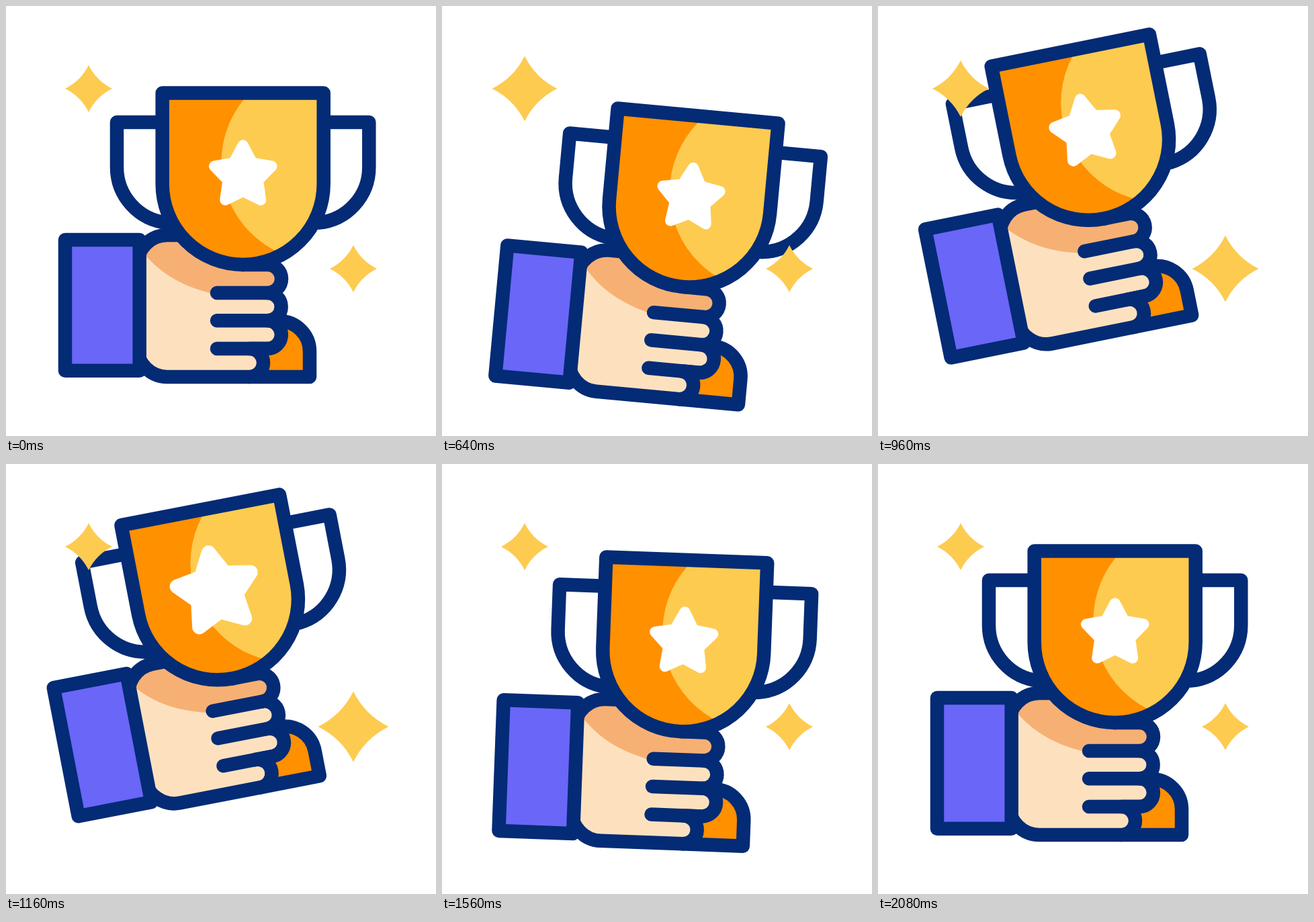
Write an HTML page with a canvas that moves like this. It is 640 px wide and 640 px high and loops after 2.12 s.

```html
<!DOCTYPE html>
<html lang="en">
<head>
<meta charset="utf-8">
<title>Trophy</title>
<style>
html, body { margin: 0; width: 100%; height: 100%; overflow: hidden; background: #fff; }
canvas { display: block; width: 100vw; height: 100vh; object-fit: contain; }
</style>
</head>
<body>
<canvas id="stage" width="640" height="640"></canvas>
<script>
const ctx = document.getElementById('stage').getContext('2d');
const LOOP = 2120, STEP = 40, LINE = 20.5;
const NAVY = '#042b75', ORANGE = '#ff9000', YELLOW = '#fdcb50',
      PURPLE = '#6a66f8', SKIN = '#fde1bf', SHADE = '#f7b074';

const base = new Path2D('M362 552H452V514A45 45 0 0 0 407 469H362Z');
const hand = new Path2D('M195 386A45 45 0 0 1 240 341H265L352 375V385H389' +
  'A20.9 20.9 0 0 1 389 427A20.6 20.6 0 0 1 389 468.3A20.8 20.8 0 0 1 389 510H362' +
  'A21 21 0 0 1 362 552H240A45 45 0 0 1 195 507Z');
const shade = new Path2D('M195 355C225 398 265 420 320 431H425V330H195Z');
const gaps = new Path2D('M314 427H389M314 468.3H389M314 510H389');
const sleeve = new Path2D('M88 347.9H198.7V542.7H88Z');
const handles = new Path2D('M232.7 173H165V240A83 83 0 0 0 240 322.6' +
  'M472.7 173H540.3V240A83 83 0 0 1 465.4 322.6');
const cup = new Path2D('M232.7 129.6H472.7V265A120 120 0 0 1 232.7 265Z');
const shine = new Path2D();
shine.arc(468.5, 232.7, 148, 0, Math.PI * 2);

const star = new Path2D();
for (let i = 0; i < 10; i++) {
  const r = i % 2 ? 23.5 : 45, a = i * Math.PI / 5;
  star.lineTo(r * Math.sin(a), 2.3 - r * Math.cos(a));
}
star.closePath();

const spark = new Path2D('M0 -35Q11.6 -11.6 35 0Q11.6 11.6 0 35Q-11.6 11.6 -35 0Q-11.6 -11.6 0 -35Z');

const ease = u => u < 0.5 ? 0.5 * (2 * u) ** 2.4 : 1 - 0.5 * (2 - 2 * u) ** 2.4;

// keys: [time, value] pairs, eased between neighbours
function tween(keys, t) {
  if (t <= keys[0][0]) return keys[0][1];
  for (let i = 1; i < keys.length; i++) {
    const [t0, v0] = keys[i - 1], [t1, v1] = keys[i];
    if (t < t1) return v0 + (v1 - v0) * ease((t - t0) / (t1 - t0));
  }
  return keys[keys.length - 1][1];
}

const tilt = [[80, 0], [558, 6], [1036, -12], [1058, -12], [1508, 2.15], [2015, 0]];
const starPop = [[820, 1], [1220, 1.32], [1610, 1]];
const leftPop = [[240, 1], [722, 1.4], [1200, 1]];
const rightPop = [[620, 1], [1120, 1.5], [1600, 1]];

function fill(path, color) {
  ctx.fillStyle = color;
  ctx.fill(path);
}

function stroke(path, color = NAVY, width = LINE) {
  ctx.strokeStyle = color;
  ctx.lineWidth = width;
  ctx.stroke(path);
}

function shaded(path, color, patch, patchColor) {
  fill(path, color);
  ctx.save();
  ctx.clip(path);
  fill(patch, patchColor);
  ctx.restore();
  stroke(path);
}

function scaled(x, y, k, draw) {
  ctx.save();
  ctx.translate(x, y);
  ctx.scale(k, k);
  draw();
  ctx.restore();
}

function drawTrophy(t) {
  const a = tween(tilt, t) * Math.PI / 180;
  ctx.save();
  // the wrist rises and falls as it turns
  ctx.translate(158, 445.5 + 158 * Math.sin(a));
  ctx.rotate(a);
  ctx.translate(-158, -445.5);
  fill(base, ORANGE);
  stroke(base);
  stroke(handles);
  shaded(hand, SKIN, shade, SHADE);
  stroke(gaps);
  fill(sleeve, PURPLE);
  stroke(sleeve);
  shaded(cup, ORANGE, shine, YELLOW);
  scaled(352.7, 250, tween(starPop, t), () => {
    fill(star, '#fff');
    stroke(star, '#fff', 16);
  });
  ctx.restore();
}

function draw(t) {
  ctx.fillStyle = '#fff';
  ctx.fillRect(0, 0, 640, 640);
  drawTrophy(t);
  scaled(123, 123, tween(leftPop, t), () => fill(spark, YELLOW));
  scaled(517, 391, tween(rightPop, t), () => fill(spark, YELLOW));
}

ctx.lineJoin = ctx.lineCap = 'round';
const start = performance.now();

function tick() {
  const t = (performance.now() - start) % LOOP;
  draw(Math.floor(t / STEP) * STEP);
  requestAnimationFrame(tick);
}
tick();
</script>
</body>
</html>
```
